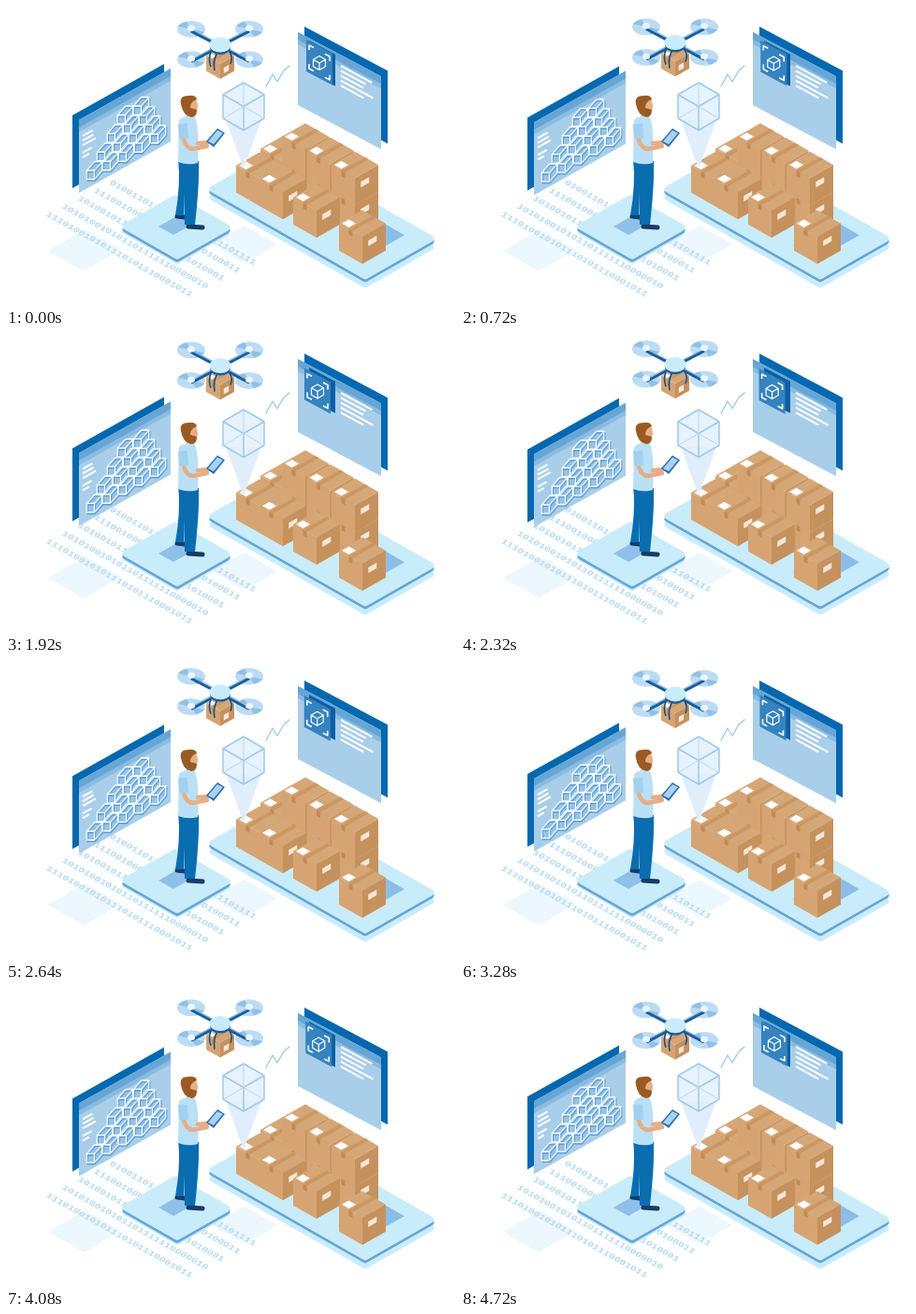
An HTML page that plays this animation: 480x320 px, repeating every 4800 ms.

```html
<!DOCTYPE html>
<html lang="en">
<head>
<meta charset="utf-8">
<title>Warehouse automation</title>
<style>
  html, body { margin: 0; width: 100%; height: 100%; overflow: hidden; background: #fff; }
  svg { display: block; width: 480px; height: 320px; }
  text { font: bold 11px "Liberation Mono", monospace; fill: #b5d9f3; white-space: pre; }
</style>
</head>
<body>
<svg id="stage" viewBox="0 0 480 320"></svg>
<script>
const SLOPE = 0.57;
const LIGHT = '#c9ecfb', PALE = '#edf7fe', MID = '#66a6d6', BODY = '#a9cee9', DARK = '#0468b0';

const poly = (points, fill, extra = '') => `<polygon points="${points}" fill="${fill}" ${extra}/>`;
const line = (d, color, width = 1, cap = 'butt') =>
  `<path d="${d}" fill="none" stroke="${color}" stroke-width="${width}" stroke-linejoin="round" stroke-linecap="${cap}"/>`;
const shape = (d, fill) => `<path d="${d}" fill="${fill}"/>`;
const ellipse = (x, y, rx, ry, fill) => `<ellipse cx="${x}" cy="${y}" rx="${rx}" ry="${ry}" fill="${fill}"/>`;
const group = (content, attributes) => `<g ${attributes}>${content}</g>`;
const repeat = (n, make) => Array.from({ length: n }, (_, i) => make(i)).join('');

let seed = 7;
const random = () => (seed = seed * 16807 % 2147483647) / 2147483647;

// Flat diamond on the floor: (x, y) is its left corner, a runs down-right and b up-right.
const diamond = (x, y, a, b, fill, extra) => poly([
  x, y, x + b, y - b * SLOPE, x + a + b, y + (a - b) * SLOPE, x + a, y + a * SLOPE], fill, extra);

// Upright parallelogram whose top edge rises or falls by the given slope.
const wall = (x, y, w, h, slope, fill) =>
  poly([x, y, x + w, y + w * slope, x + w, y + w * slope + h, x, y + h], fill);

function platform(x, y, a, b, depth) {
  const layer = (dy, color) => diamond(x, y + dy, a, b, color,
    `stroke="${color}" stroke-width="7" stroke-linejoin="round"`);
  return layer(depth, LIGHT) + layer(3, MID) + layer(0, LIGHT);
}

// Carton standing on its lowest corner (x, y).
function carton(x, y, size = 25, h = 29) {
  const top = y - h, rise = size * SLOPE;
  const lid = (x0, y0, a, b, fill) => diamond(x - size + x0 * size, top - rise + y0 * rise, a * size, b * size, fill);
  return lid(0, 0, 1, 1, '#d6a776')
    + lid(.42, .42, .16, 1, '#cb9763')
    + wall(x - size, top - rise, size, h, SLOPE, '#d6a472')
    + wall(x, top, size, h, -SLOPE, '#c5915d')
    + wall(x - size * .58, top - rise * .58, size * .16, 6, SLOPE, '#c08b57')
    + lid(.12, 0, .3, .3, '#fff')
    + wall(x + size * .25, top + 4, size * .36, 6, -SLOPE, '#f3e6d8');
}

const cartonRow = (x, y, count, gap, levels = 1) => repeat(count, i =>
  repeat(levels, k => carton(x + i * gap, y + i * gap * SLOPE - k * 29)));

function wireCube(x, y, w, h, color, width, fill = 'none') {
  const d = h / 2;
  return shape(`M${x} ${y - h}l${w} ${d}v${h}l${-w} ${d}l${-w} ${-d}v${-h}Z`, fill)
    + line(`M${x} ${y - h}l${w} ${d}v${h}l${-w} ${d}l${-w} ${-d}v${-h}ZM${x - w} ${y - d}l${w} ${d}l${w} ${-d}M${x} ${y}v${h}`,
      color, width);
}

// A screen with a header bar, set off from a dark sheet behind it.
const screen = (x, y, w, h, slope, dx, dy) => wall(x + dx, y + dy, w, h, slope, DARK)
  + wall(x, y, w, h, slope, BODY) + wall(x, y, w, 13, slope, '#8abbe0') + wall(x, y, w, 8, slope, MID);

const textLines = (n, x, y, gap, length, slope) => repeat(n, i => {
  const w = length * (1 - .35 * random());
  return line(`M${x} ${y + i * gap}l${w} ${w * slope}`, '#fff', 2);
});

const binaryRow = i => group(`<text>${repeat(27, () => random() < .4 ? 0 : 1)}</text>`,
  `transform="matrix(.87 .49 -.5 .6 ${110 - 17 * i} ${190 + 8.5 * i})"`);
const floor = diamond(45, 262, 38, 40, PALE) + diamond(220, 255, 35, 35, PALE) + repeat(5, binaryRow);

// Honeycomb of cubes: each row is one shorter than the row below.
const honeycomb = (color, width, fill) => repeat(4, row => repeat(5 - row, i =>
  wireCube(17 * i + 11 * row, -13.5 * row, 8.2, 9.5, color, width, fill)));
const leftScreen = screen(78, 122, 98, 78, -.56, -7, -5)
  + textLines(3, 82, 139, 5, 14, -.56) + textLines(2, 82, 157, 5, 10, -.56)
  + group(honeycomb('#5b9ed6', 1.4, '#97c3e6'), 'transform="matrix(1 -.57 0 1 95.5 177.5)"')
  + group(honeycomb('#fff', 1.2), 'transform="matrix(1 -.57 0 1 94.5 176)"');

const corner = (x, y, dx, dy) => line(`M${x} ${y + dy}v${-dy}l${dx} ${dx * .53}`, '#fff', 1.6);
const rightScreen = screen(312, 28, 89, 78, .53, 7, -6)
  + textLines(5, 358, 64, 5.3, 35, .54)
  + wall(324, 37, 28, 34, .53, '#0a5fa3')
  + group(wall(321, 36, 28, 34, .53, '#3583bf')
    + corner(324, 42, 5, 5) + corner(346, 54, -5, 5) + corner(324, 67, 5, -5) + corner(346, 79, -5, -5)
    + wireCube(335, 61, 6.5, 7.5, '#fff', 1.2), 'id="tile"');

const hologram = poly('235,122 273,122 254,174', '#e0eefb')
  + wireCube(254, 107.5, 22, 25.5, '#9fcaec', 1.5, '#e3f1fce0')
  + line('M254 82v25.5l-22 13M254 107.5l22 13', '#b9d9f3')
  + line('M278 86L285 73L290 81L297 69L303 64', '#9cc8ec', 1.3, 'round');

const stock = platform(221, 196, 163, 70, 9)
  + diamond(355, 256, 26, 45, '#8dbde6')
  + carton(297, 196) + cartonRow(320, 212, 3, 26.5, 2)
  + cartonRow(271, 214, 2, 25) + cartonRow(332, 248, 2, 49);

const SKIN = '#e6ae86';
const man = platform(128, 236, 55, 53, 5)
  + diamond(163, 236, 16, 24, '#8fc0ea')
  + line('M183 225l8 1M195 236l15 1', '#173b68', 5, 'round')
  + shape('M184 164L206 166Q207 190 202 234H191L190 200L190 224H181Q187 190 184 164z', '#0a6db0')
  + line('M197 112v8', '#dba07a', 8)
  + shape('M185 122Q192 116 201 118Q207 126 205 168Q195 171 184 167z', '#b9e0f7')
  + ellipse(198, 107, 7, 10, SKIN)
  + shape('M187 105Q185 96 195 96Q203 95 204 100Q197 102 197 109L204 111Q204 119 198 119Q189 117 187 105z', '#9b5a24')
  + line('M190 143Q193 153 200 153L215 150M205 147l11 -1', SKIN, 4.5, 'round')
  + line('M189 126L190 142', '#a2d0ee', 10)
  + poly('214,145 226,131 234,136 222,151', '#2d6fae')
  + poly('216,145 226,133 232,136 222,148', '#a8d2f3');

// Four rotors mirrored about the body, joined by crossed arms.
const rotors = [[-1, -1], [1, -1], [-1, 1], [1, 1]].map(([sx, sy]) => [229 + 31 * sx, 41 + 16.3 * sy]);
const rotorDisc = ([x, y]) => ellipse(x, y, 15, 9, '#bcdcf4')
  + shape(`M${x} ${y}l-14 -3a15 9 0 0 1 9 -5zM${x} ${y}l14 3a15 9 0 0 1 -9 5z`, '#92c0e6');
const rotorArm = ([x, y]) => line(`M229 43L${x} ${y + 2}`, '#195d9b', 3.5) + line(`M229 41L${x} ${y}`, '#86b9e3', 1.3);
const rotorHub = ([x, y]) => ellipse(x, y - 1, 4, 3.2, '#eaf6fd');
const drone = carton(229, 78, 15, 16)
  + rotors.map(rotorDisc).join('') + rotors.map(rotorArm).join('') + rotors.map(rotorHub).join('')
  + line('M219 49q-3 8 0 16M226 50q-5 8 -3 19M239 49q4 6 1 13', '#164f87', 1.6)
  + ellipse(229, 44, 11, 8, '#195d9b') + ellipse(229, 41.5, 11.5, 8, LIGHT);

const stage = document.getElementById('stage');
stage.innerHTML = floor + group(leftScreen, 'id="screen"') + rightScreen + stock + hologram + man + group(drone, 'id="drone"');

const move = (id, x, y) => document.getElementById(id).setAttribute('transform', `translate(${x} ${y})`);

// Everything drifts out and back linearly, in 80 ms steps.
function draw(now) {
  const t = Math.floor(now % 4800 / 80) * 80;
  const drift = 1 - Math.abs(t / 2400 - 1);
  move('drone', 0, -8 * drift);
  move('screen', 0, 8 * drift);
  move('tile', -2.5 * drift, 2 * drift);
  requestAnimationFrame(draw);
}
draw(performance.now());
</script>
</body>
</html>
```
